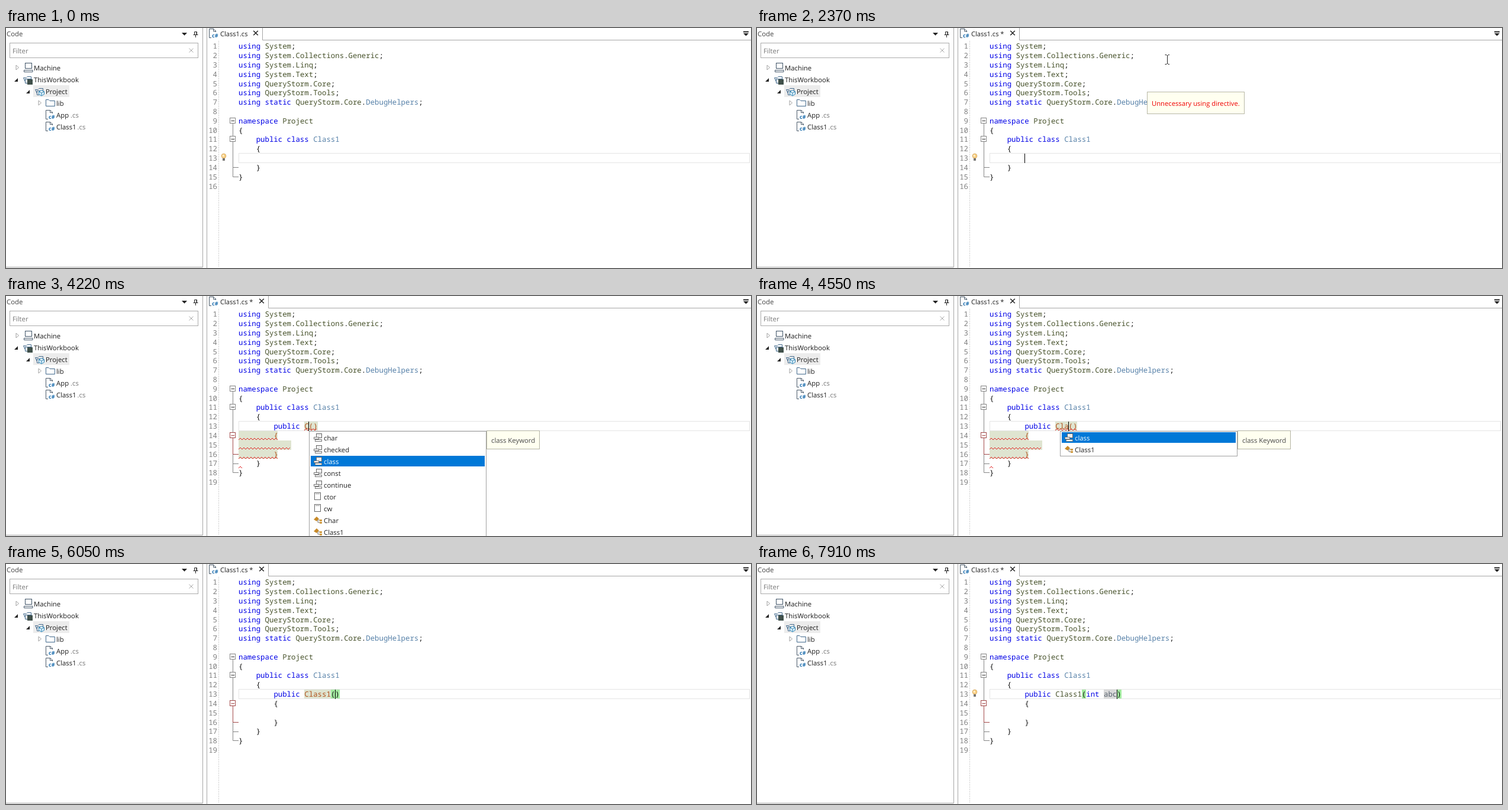
Write an HTML page that moves like this. It is 1259 px wide and 407 px high and loops after 8000 ms.

```html
<!DOCTYPE html>
<html lang="en">
<head>
<meta charset="utf-8">
<title>Code editor</title>
<style>
html, body { margin: 0; width: 100%; height: 100%; overflow: hidden; background: #fff; }
svg { display: block; width: 100%; height: 100%; }
text { white-space: pre; text-rendering: geometricPrecision; }
.ui { font: 11.35px "Open Sans", "Noto Sans", sans-serif; }
.code { font: 12.37px "Noto Sans Mono", "DejaVu Sans Mono", monospace; }
</style>
</head>
<body>
<svg id="stage" viewBox="0 0 1259 407">
  <g id="base"></g>
  <g id="live"></g>
</svg>
<script>
const LOOP = 8000, X0 = 393, CW = 7.422;
const KEY = '#0000e6', NAME = '#46512a', TYPE = '#5680a8', INK = '#111', RUST = '#b0521c';
const FOLD = '#858585', FOLD_RED = '#a34a4a', SOFT = '#dfe4d0', PAREN = '#a3eba0';

const colX = c => X0 + c * CW;
const baseline = n => Math.round(35.25 + 15.82 * (n - 1));

const rect = (x, y, w, h, fill, stroke = 'none') =>
  `<rect x="${x}" y="${y}" width="${w}" height="${h}" fill="${fill}" stroke="${stroke}" shape-rendering="crispEdges"/>`;
const path = (d, stroke, fill = 'none', w = 1) =>
  `<path d="${d}" stroke="${stroke}" fill="${fill}" stroke-width="${w}"/>`;
const label = (x, y, s, fill = '#1c1c1c', extra = '') =>
  `<text class="ui" x="${x}" y="${y}" fill="${fill}" ${extra}>${s}</text>`;
const code = (line, col, s, fill = INK) =>
  `<text class="code" x="${colX(col)}" y="${baseline(line)}" fill="${fill}">${s}</text>`;

// Consecutive coloured pieces on one line
function tokens(line, col, ...parts) {
  let out = '';
  for (const [s, fill] of parts) {
    out += code(line, col, s, fill);
    col += s.length;
  }
  return out;
}

function zigzag(x, end, y) {
  let d = `M${x} ${y + 3}`;
  for (let i = 1; x + i * 3 <= end; i++) d += `L${x + i * 3} ${y + (i % 2 ? 0 : 3)}`;
  return path(d, '#e02020');
}

const fileIcon = (x, y) =>
  path(`M${x + 4} ${y + 15.5}H${x + .5}V${y + .5}H${x + 8}L${x + 11.5} ${y + 4}V${y + 6}M${x + 7.5} ${y + .5}V${y + 4.5}H${x + 11.5}`, '#4a5a6a') +
  label(x + 5, y + 15, 'c#', '#1f6fae', 'style="font-size:9px;font-weight:700"');
const folderIcon = (x, y) =>
  path(`M${x + .5} ${y + 11.5}V${y + .5}H${x + 5}L${x + 7} ${y + 2.5}H${x + 15.5}V${y + 11.5}Z`, '#40688c');
const openFolder = (x, y) =>
  path(`M${x + 7} ${y + 11.5}H${x + 3.5}V${y + 4.5}H${x + 14.5}M${x + 3.5} ${y + 9}L${x + .5} ${y + 2.5}H${x + 5}L${x + 7} ${y + .5}H${x + 13.5}V${y + 4}`, '#40688c');
const closedArrow = (x, y) => path(`M${x} ${y - 4}L${x + 4.5} ${y}L${x} ${y + 4}Z`, '#a0a0a0');
const openArrow = (x, y) => path(`M${x} ${y}H${x - 6}L${x} ${y - 6}Z`, 'none', '#222');
const cross = (x, y, r, color, w) =>
  path(`M${x - r} ${y - r}L${x + r} ${y + r}M${x + r} ${y - r}L${x - r} ${y + r}`, color, 'none', w);

function drawBase() {
  let s = '';
  // Side panel
  s += label(1, 14, 'Code', '#444') + path('M297 8H306L301.5 12.8Z', 'none', '#222');
  s += path('M318.5 6.5H322.5V11.5H318.5ZM322 6.5V11.5M316.5 11.5H324.5M320.5 12V16', '#222');
  s += rect(6.5, 25.5, 318, 25, '#fff', '#ababab') + label(11, 43, 'Filter', '#777');
  s += cross(313, 38, 3.5, '#aaa', 1);
  s += closedArrow(17, 67) + rect(32.5, 59.5, 11, 9, '#fff', '#3e5266');
  s += path('M30.5 74.5V71.5H45V74.5Z', '#3e5266') + label(47, 72, 'Machine');
  s += openArrow(20, 91) + openFolder(29, 82) + rect(36, 87, 9, 9, '#40504a');
  s += label(47, 92, 'ThisWorkbook');
  s += rect(46, 97, 61, 20, '#ececec') + openArrow(40, 111) + openFolder(49, 102);
  s += path('M60 105.5L64.5 108V112.5L60 115L55.5 112.5V108ZM55.5 108L60 110.2L64.5 108M60 110.2V115', '#2f87b8', '#e2f2fa');
  s += label(67, 112, 'Project');
  s += closedArrow(55, 127) + folderIcon(67, 121) + label(85, 132, 'lib');
  s += fileIcon(67, 139) + label(85, 152, 'App') + label(109, 152, '.cs', '#777');
  s += fileIcon(67, 159) + label(85, 172, 'Class1') + label(120.5, 172, '.cs', '#777');
  s += path('M0 405.5H332.5V0', '#a6a6a6');
  // Editor frame
  s += path('M339.5 0V407', '#a6a6a6');
  s += '<path d="M359.5 22V405" stroke="#a8a8a8" stroke-dasharray="1 2"/>';
  s += path('M1246 6.5H1255', '#222', 'none', 2) + path('M1246 9H1255L1250.5 13.5Z', 'none', '#222');
  s += fileIcon(343, 1);
  // Fixed code
  const imports = ['System', 'System.Collections.Generic', 'System.Linq', 'System.Text', 'QueryStorm.Core', 'QueryStorm.Tools'];
  imports.forEach((name, i) => {
    s += code(i + 1, 0, 'using', KEY);
    s += tokens(i + 1, 6, ...name.split(/(\.)/).map(p => [p, p === '.' ? INK : NAME]), [';', INK]);
  });
  s += tokens(7, 0, ['using static', KEY], [' QueryStorm', NAME], ['.', INK], ['Core', NAME], ['.', INK], ['DebugHelpers', TYPE], [';', INK]);
  s += tokens(9, 0, ['namespace', KEY], [' Project', NAME]) + code(10, 0, '{');
  s += tokens(11, 4, ['public class', KEY], [' Class1', TYPE]) + code(12, 4, '{');
  s += rect(393.5, 212.5, 863, 16, '#fff', '#e4e4e4');
  return s;
}

const foldBox = (y, color) =>
  rect(378.5, y - 4.5, 9, 9, '#fff', color) + path(`M380.5 ${y + .5}H386`, color === FOLD ? '#333' : color);

function drawFolds(full) {
  const mid = full ? 284.5 : 236.5, end = full ? 299.5 : 252.5;
  let s = path(`M383.5 162V${end}H393M383.5 ${mid}H393`, FOLD);
  s += foldBox(157, FOLD) + foldBox(188, FOLD);
  if (full) s += path('M383.5 241V268.5H393', FOLD_RED) + foldBox(236, FOLD_RED);
  return s;
}

const bulb = () =>
  '<circle cx="368" cy="217" r="3.8" fill="#fbd48a" stroke="#d9a95c"/>' +
  rect(366, 221, 4, 4, '#777') + rect(366, 215, 2, 3, '#fff3d6');

const ibeam = ([x, y]) =>
  path(`M${x - 3.5} ${y - 7.5}H${x - 1}L${x + .5} ${y - 6}L${x + 2} ${y - 7.5}H${x + 4}M${x + .5} ${y - 6}V${y + 7}M${x - 3.5} ${y + 8.5}H${x - 1}L${x + .5} ${y + 7}L${x + 2} ${y + 8.5}H${x + 4}`, '#222');

function itemIcon(kind, x, y) {
  if (kind === 's') return rect(x + 1.5, y - 6.5, 10, 12, '#fff', '#666') + path(`M${x + 3} ${y - 4.5}H${x + 10}`, '#999');
  if (kind === 'k') return rect(x + 4.5, y - 6.5, 9, 7, '#eee', '#666') + rect(x + .5, y - .5, 8, 3, '#fff', '#777') + rect(x + 2.5, y + 3.5, 11, 3, '#fff', '#777');
  return path(`M${x + 5} ${y - 6}L${x + 9} ${y - 2}L${x + 5} ${y + 2}L${x} ${y - 1}Z`, 'none', '#c88a28') +
    path(`M${x + 7} ${y}V${y + 4}H${x + 10}M${x + 8} ${y}H${x + 11}`, '#777') +
    rect(x + 10, y - 1, 4, 3, '#d09a40') + rect(x + 10, y + 3, 4, 3, '#d09a40');
}

function drawPopup(x, items, chosen) {
  let s = rect(x + .5, 229.5, 299, 20 * items.length + 2, '#fff', '#a0a0a0');
  items.forEach((item, i) => {
    const [kind, name] = item.split(':'), y = 240 + 20 * i;
    if (i === chosen) s += rect(x + 3, y - 9, 294, 18, '#0078d7');
    s += itemIcon(kind, x + 8, y) + label(x + 25, y + 5, name, i === chosen ? '#fff' : '#222');
  });
  return s;
}

const drawTip = (x, w, s) => rect(x + .5, 228.5, w - 1, 31, '#fffff0', '#b4b4a4') + label(x + 8, 249, s, '#4a4a4a');

const words = (kind, list) => list.split(' ').map(w => kind + ':' + w);
const C_LIST = [...words('k', 'char checked class const continue'), ...words('s', 'ctor cw'), ...words('c', 'Char Class1')];
const CLASS_LIST = ['k:class', 'c:Class1'];
const I_LIST = [...words('k', 'if implicit in int interface internal is'), ...words('c', 'IAsyncResult ICloneable')];
const SNIPPET = [240, 'Snippet, press Enter or tab+tab to expand.'];
const CLASS_TIP = [90, 'class Keyword'], INT_TIP = [79, 'int Keyword'];
const NONE = { list: null, tip: null };

// Each step changes part of the editor's state from its time on
const steps = [
  [0, { bulb: 1, typed: '', param: '', caret: 0, at: 0, row: 0 }],
  [130, { mouse: [1005, 355] }], [205, { mouse: [590, 251] }], [280, { mouse: [747, 312] }],
  [530, { mouse: [715, 296] }], [605, { mouse: [650, 260] }], [680, { mouse: [585, 228] }],
  [760, { mouse: [561, 218] }], [910, { mouse: [559, 217] }],
  [1290, { caret: 1 }],
  [2060, { at: 8, mouse: [585, 195] }], [2140, { dirty: 1, mouse: [620, 155] }],
  [2215, { mouse: [651, 108] }], [2290, { hint: 1, mouse: [680, 70] }], [2370, { mouse: [693, 53] }],
  [2680, { typed: 'c', at: 9, mouse: null, hint: 0 }],
  [2760, { list: C_LIST, px: 460, tip: [89, 'char Keyword'] }],
  [2910, { typed: 'ct', at: 10, row: 0, list: ['s:ctor'], tip: SNIPPET }],
  [2990, { typed: 'cto', at: 11 }], [3140, { typed: 'ctor', at: 12 }],
  [3370, { bulb: 0 }], [3520, { wave: 1 }],
  [3690, { ...NONE, wave: 0 }],
  [3765, { full: 1, typed: 'Class1', at: 21, nameBg: SOFT }],
  [4220, { typed: 'C', at: 16, broken: 1, list: C_LIST, px: 512, row: 2, tip: CLASS_TIP }],
  [4380, { typed: 'Cl', at: 17, list: CLASS_LIST, row: 0 }],
  [4550, { typed: 'Cla', at: 18 }], [4720, { typed: 'Clas', at: 19 }], [4790, { typed: 'Class', at: 20 }],
  [5110, { bulb: 1 }],
  [5260, { row: 1, tip: [116, 'class Project.Class1'] }], [5350, { broken: 0 }],
  [5580, { ...NONE, typed: 'Class1', at: 21 }],
  [5730, { at: 22, parens: 1, caret: 0 }],
  [5900, { bulb: 0 }], [6050, { caret: 1 }], [6370, { nameBg: '#fdf0c4' }],
  [6520, { param: 'i', at: 23, list: I_LIST, px: 564, row: 2, tip: [74, 'in Keyword'] }],
  [6600, { param: 'in', at: 24, list: words('k', 'in int interface internal'), row: 0 }],
  [6675, { param: 'int', at: 25, list: words('k', 'int interface internal'), tip: INT_TIP }],
  [6750, { param: 'int ', at: 26, list: null }], [6830, { tip: null }],
  [6910, { param: 'int a', at: 27 }], [7060, { param: 'int ab', at: 28 }],
  [7380, { bulb: 1 }], [7450, { nameBg: null }],
  [7680, { param: 'int abc', at: 29 }], [7910, { paramBg: 1 }]
];

function drawEntry(st) {
  const mark = (col, n, fill) => rect(colX(col), 213, n * CW, 15, fill);
  if (!st.full) return code(13, 8, st.typed);
  const open = 15 + st.typed.length, close = open + 1 + st.param.length;
  const ink = st.broken ? RUST : INK;
  let s = '';
  if (st.broken) {
    s += mark(15, close - 14, SOFT);
    s += rect(393, 229, 66, 16, SOFT) + rect(393, 245, 89, 16, SOFT) + rect(393, 261, 66, 15, SOFT);
  } else if (st.nameBg) s += mark(15, st.typed.length, st.nameBg);
  if (st.parens) s += mark(open, 1, PAREN) + mark(close, 1, PAREN);
  if (st.paramBg) s += mark(open + 5, 3, '#d9d9d9');
  const nameInk = !st.nameBg ? NAME : st.nameBg === SOFT ? RUST : '#8a5a20';
  s += code(13, 8, 'public', KEY);
  s += tokens(13, 15, [st.typed, nameInk], ['(', ink], [st.param.slice(0, 3), st.param.length < 3 ? INK : KEY], [st.param.slice(3), '#5a6470'], [')', ink]);
  s += code(14, 8, '{', ink) + code(16, 8, '}', ink);
  if (st.broken) {
    s += zigzag(504, colX(close + 1), 225) + zigzag(393, 459, 241) + zigzag(393, 482, 257);
    s += zigzag(393, 459, 273) + zigzag(393, 400, 289);
  }
  return s;
}

function draw(st) {
  const tabEnd = st.dirty ? 443.5 : 433.5;
  let s = path(`M${tabEnd} 0V20.5H1259`, '#a6a6a6');
  s += label(362, 14, st.dirty ? 'Class1.cs *' : 'Class1.cs', '#1c1c1c', 'style="font-size:11.1px"');
  s += cross(tabEnd - 11.5, 8.5, 3.8, '#222', 1.5);
  for (let n = 1; n <= (st.full ? 19 : 16); n++)
    s += `<text class="code" x="357" y="${baseline(n)}" text-anchor="end" fill="#808080">${n}</text>`;
  s += drawFolds(st.full) + drawEntry(st);
  s += code(st.full ? 17 : 14, 4, '}') + code(st.full ? 18 : 15, 0, '}');
  if (st.wave) s += zigzag(393, 421, 241);
  if (st.bulb) s += bulb();
  if (st.caret) s += rect(Math.floor(colX(st.at)), 213, 1, 16, '#000');
  if (st.list) s += drawPopup(st.px, st.list, st.row);
  if (st.tip) s += drawTip(st.px + 300, ...st.tip);
  if (st.hint) s += rect(659.5, 108.5, 164, 37, '#fffff0', '#b8b8a8') + label(667, 132, 'Unnecessary using directive.', '#f00000', 'style="font-size:11.25px"');
  if (st.mouse) s += ibeam(st.mouse);
  return s;
}

const live = document.getElementById('live');
document.getElementById('base').innerHTML = drawBase();
const start = performance.now();
let shown = 0;

function tick() {
  const t = (performance.now() - start) % LOOP;
  const past = steps.filter(([at]) => at <= t);
  if (past.length !== shown) {
    shown = past.length;
    live.innerHTML = draw(Object.assign({}, ...past.map(p => p[1])));
  }
  requestAnimationFrame(tick);
}
tick();
</script>
</body>
</html>
```
